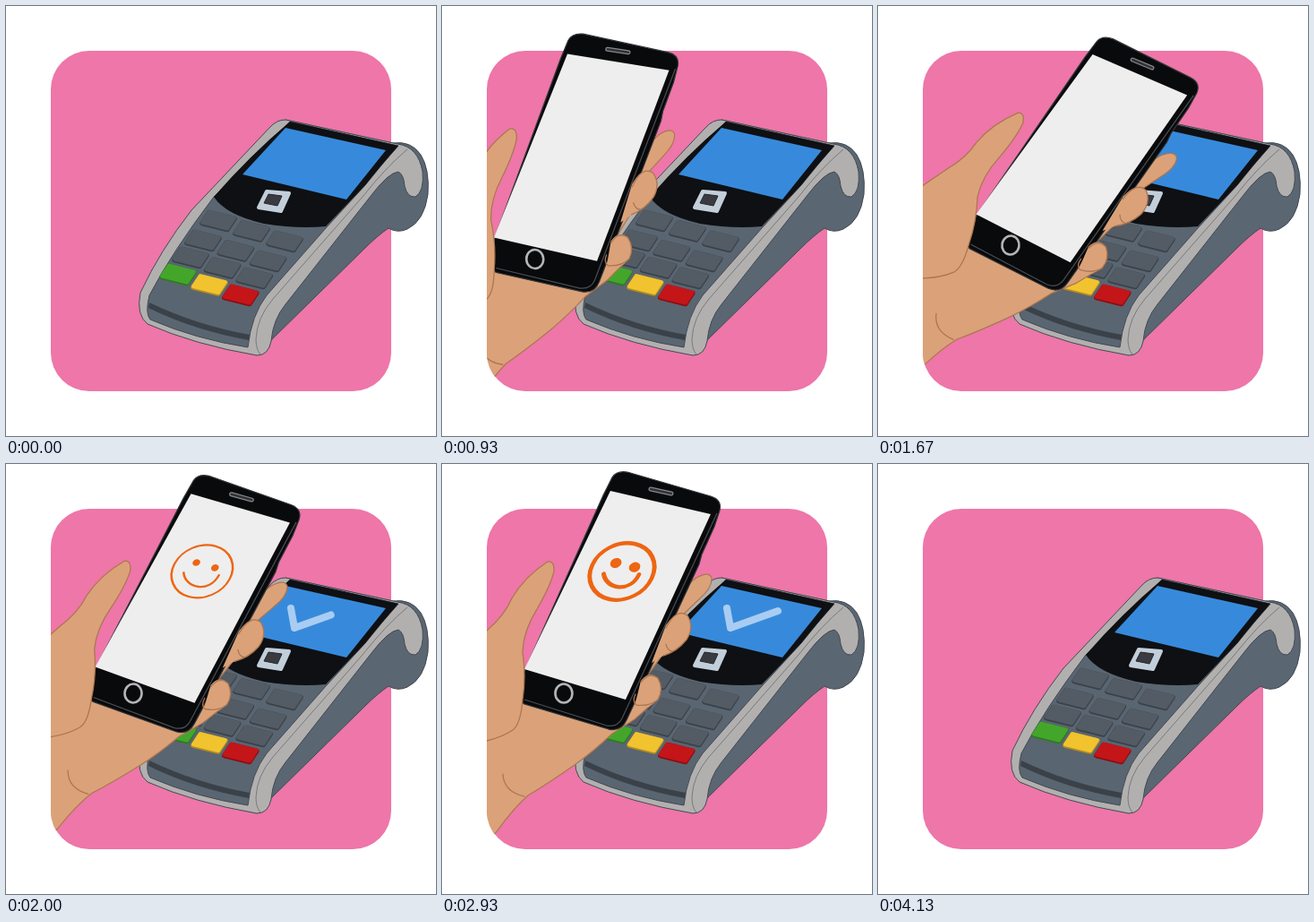
Animation of 480x480 px, one loop 4340 ms. Source, as an HTML page:

```html
<!DOCTYPE html>
<html lang="en">
<head>
<meta charset="utf-8">
<title>Contactless payment</title>
<style>
  html, body { margin: 0; width: 100%; height: 100%; overflow: hidden; background: #fff; }
  svg { display: block; width: 100vw; height: 100vh; }
  .line { fill: none; stroke: #ad7650; stroke-width: 1.3; stroke-linecap: round; }
  .skin { fill: #dba279; }
  .edge { stroke: #434a52; stroke-width: 1; stroke-linejoin: round; }
</style>
</head>
<body>
<svg viewBox="0 0 480 480">
  <defs>
    <clipPath id="stage"><path d="M50 0H480V430H92A42 42 0 0 1 50 388Z"/></clipPath>
  </defs>
  <rect x="50" y="50" width="380" height="380" rx="43" fill="#ee76a8"/>

  <g id="terminal">
    <path class="edge" fill="#5a6672" d="M312 127L432 153Q452 150 463 166Q473 182 471 210Q467 240 448 249Q437 254 427 248Q415 256 400 271L297 372L285 389L270 300Z"/>
    <path class="edge" fill="#b2b0af" d="M312 127Q302 127 294 136L207 228Q172 273 150 320Q145 345 158 355Q210 378 280 390Q293 390 296 374Q298 350 312 333L408 211Q427 186 438 185Q444 188 445 201Q448 214 457 213Q467 207 465 185Q460 157 437 154Z"/>
    <path fill="none" stroke="#77797c" d="M448 160Q424 180 398 213L298 327Q280 348 279 372Q279 383 284 389"/>
    <path class="edge" fill="#596571" d="M317 129L438 156Q420 176 401 200L357 248L291 323Q274 345 270 381Q212 372 161 350Q155 343 160 323Q185 275 232 213Z"/>
    <path fill="#0e1013" d="M317 129L438 156Q420 176 401 200L357 246Q325 249 288 243Q245 233 232 213Q272 167 317 129Z"/>
    <path fill="#378adb" d="M312 136L424 161L380 216L264 188Z"/>
    <path fill="#3a4149" d="M160 331Q212 356 272 367L271 373Q210 362 159 337Z"/>
    <path fill="#c2ced9" stroke="#c2ced9" stroke-width="4" stroke-linejoin="round" d="M291 207L316 209L307 229L282 225Z"/>
    <path fill="#393b40" stroke="#25272b" d="M293 210L308 212L303 223L288 220Z"/>
    <g id="keys"></g>
    <path id="check" pathLength="100" fill="none" stroke="#a9cdf2" stroke-width="8" stroke-linecap="round" stroke-linejoin="round" d="M318 161L322 183L375 164"/>
  </g>

  <g clip-path="url(#stage)">
    <g id="hand">
      <path class="skin" stroke="#ad7650" stroke-width="1.2" stroke-linejoin="round" d="M255 150L284 127Q298 119 301 127Q302 138 287 151L263 174L246 213L226 241L240 263L215 285L190 301Q170 320 148 336Q118 357 96 370Q80 384 62 409L-100 610V300L85 250L240 200Z"/>

      <path fill="#090a0c" stroke="#33363a" stroke-width="1.2" d="M190 15Q195 7 207 9L300 36Q313 40 310 52L304 70L290 101L287 112L206 286Q200 299 186 296L92 268Q80 262 85 247L180 35Z"/>
      <path fill="none" stroke="#4a4d52" stroke-width="1.2" d="M307 55L201 284Q196 294 184 292L92 263"/>
      <path fill="#eee" d="M188 30L300 56L205 263L92 229Z"/>
      <path fill="none" stroke="#85878a" stroke-width="5" stroke-linecap="round" d="M233 28L256 33"/>
      <path fill="none" stroke="#303236" stroke-width="2.5" stroke-linecap="round" d="M233 28L256 33"/>
      <ellipse cx="136" cy="256" rx="9.5" ry="10.5" fill="none" stroke="#b4b5b7" stroke-width="2.6"/>

      <g id="smile" fill="none" stroke="#ee6512" stroke-linecap="round">
        <circle id="face"/>
        <path d="M-18 7C-8 24 19 22 19 -1"/>
        <g fill="#ee6512" stroke="none"><circle class="eye" cx="-10.5" cy="-8"/><circle class="eye" cx="11" cy="-8"/></g>
      </g>

      <g transform="translate(1 2)">
        <path class="skin" d="M249 178Q261 159 273 167Q281 180 272 194Q262 206 246 212L233 220Z"/>
        <path class="line" d="M249 181Q261 158 273 167Q281 180 272 194Q262 207 246 212M249 199Q251 207 257 207"/>
        <path class="skin" d="M221 240Q230 228 240 237Q247 249 240 261Q229 272 213 273Z"/>
        <path class="line" d="M221 242Q230 229 240 237Q247 249 240 261Q231 269 216 267Q211 263 215 255"/>
      </g>
      <path class="skin" d="M-100 335L50 186Q70 169 78 150Q92 126 118 109Q126 108 125 120Q121 136 106 162Q91 186 90 209Q94 237 90 263Q88 290 79 297L60 360L-100 450Z"/>
      <path class="line" d="M-100 335L50 186Q70 169 78 150Q92 126 118 109Q126 108 125 120Q121 136 106 162Q91 186 90 209Q94 237 90 263Q88 290 79 297Q64 307 40 311M68 346Q69 366 92 371"/>
    </g>
  </g>
</svg>
<script>
const LOOP = 4340, STEP = 1000 / 15;
const get = id => document.getElementById(id);
const clamp = v => Math.max(0, Math.min(1, v));
const ramp = (t, from, to) => clamp((t - from) / (to - from));

// Keypad: each row steps down and to the left, with slightly closer keys.
const rows = [[237, 239], [220, 261], [206, 280], [192, 299]];
const colors = [['#43a62b', '#2f7a1f'], ['#f1c32f', '#b48c1f'], ['#c41519', '#8a0f12']];
const keyShape = 'M-10-9L18-2L10 10L-18 3Z';
get('keys').innerHTML = rows.map(([x, y], row) => colors.map((color, col) => {
  const [fill, dark] = row == 3 ? color : ['#535b65', '#3a4149'];
  const place = `translate(${x + col * (37 - row * .7)} ${y + col * 11.5})`;
  const key = (dy, paint, width) =>
    `<path transform="translate(0 ${dy})" d="${keyShape}" fill="${paint}" stroke="${paint}" stroke-width="${width}" stroke-linejoin="round"/>`;
  return `<g transform="${place}">${key(.5, dark, 5.5)}${key(-.4, fill, 4)}</g>`;
}).join('')).join('');

// Hand pose: time, x, y, rotation about the home button.
const poses = [
  [670, -255, 198, -6], [930, -33, 27, -4], [1130, -8, 10, 0], [1400, 8, 8, 7],
  [1670, 12, 11, 10.3], [1800, 11, 6, 8], [2000, 6, 0, 3.2], [2200, 1, 0, .5],
  [2400, 0, 0, 0], [2930, 0, 0, 0], [3330, -255, 198, -7]
];

const secant = (i, c) => (poses[i + 1][c] - poses[i][c]) / (poses[i + 1][0] - poses[i][0]);

function slope(i, c) {
  if (i == 0 || i == poses.length - 1) return 0;
  const a = secant(i - 1, c), b = secant(i, c);
  return a * b > 0 ? 2 * a * b / (a + b) : 0;
}

// Monotone cubic interpolation of one pose component.
function pose(t, c) {
  const last = poses.length - 1;
  if (t <= poses[0][0]) return poses[0][c];
  if (t >= poses[last][0]) return poses[last][c];
  const i = poses.findIndex(p => p[0] > t) - 1;
  const span = poses[i + 1][0] - poses[i][0];
  const u = (t - poses[i][0]) / span, v = 1 - u;
  return v * v * (1 + 2 * u) * poses[i][c] + u * u * (3 - 2 * u) * poses[i + 1][c]
    + span * u * v * (v * slope(i, c) - u * slope(i + 1, c));
}

function draw(now) {
  const t = Math.floor((now % LOOP + 5) / STEP) * STEP;

  const hand = get('hand');
  hand.style.display = t > 670 && t < 3330 ? '' : 'none';
  hand.setAttribute('transform',
    `translate(${pose(t, 1)} ${pose(t, 2)}) rotate(${pose(t, 3)} 136 256)`);

  const grow = ramp(t, 1870, 2300), smile = get('smile');
  smile.setAttribute('opacity', ramp(t, 1860, 1960));
  smile.setAttribute('stroke-width', 1.4 + 3.2 * grow);
  smile.setAttribute('transform',
    `matrix(.976 .216 -.421 .907 ${201 + 6 * (1 - grow)} ${120 - 6 * (1 - grow)})`);
  get('face').setAttribute('r', 31 + 3 * grow);
  smile.querySelectorAll('.eye').forEach(eye => eye.setAttribute('r', 3.2 + 2.8 * grow));

  const drawn = 100 * (ramp(t, 1800, 2040) - ramp(t, 3530, 3730));
  const check = get('check');
  check.style.display = drawn > 0 ? '' : 'none';
  check.setAttribute('stroke-dasharray', `${drawn} 200`);
}

function tick() {
  draw(performance.now());
  requestAnimationFrame(tick);
}
tick();
</script>
</body>
</html>
```
